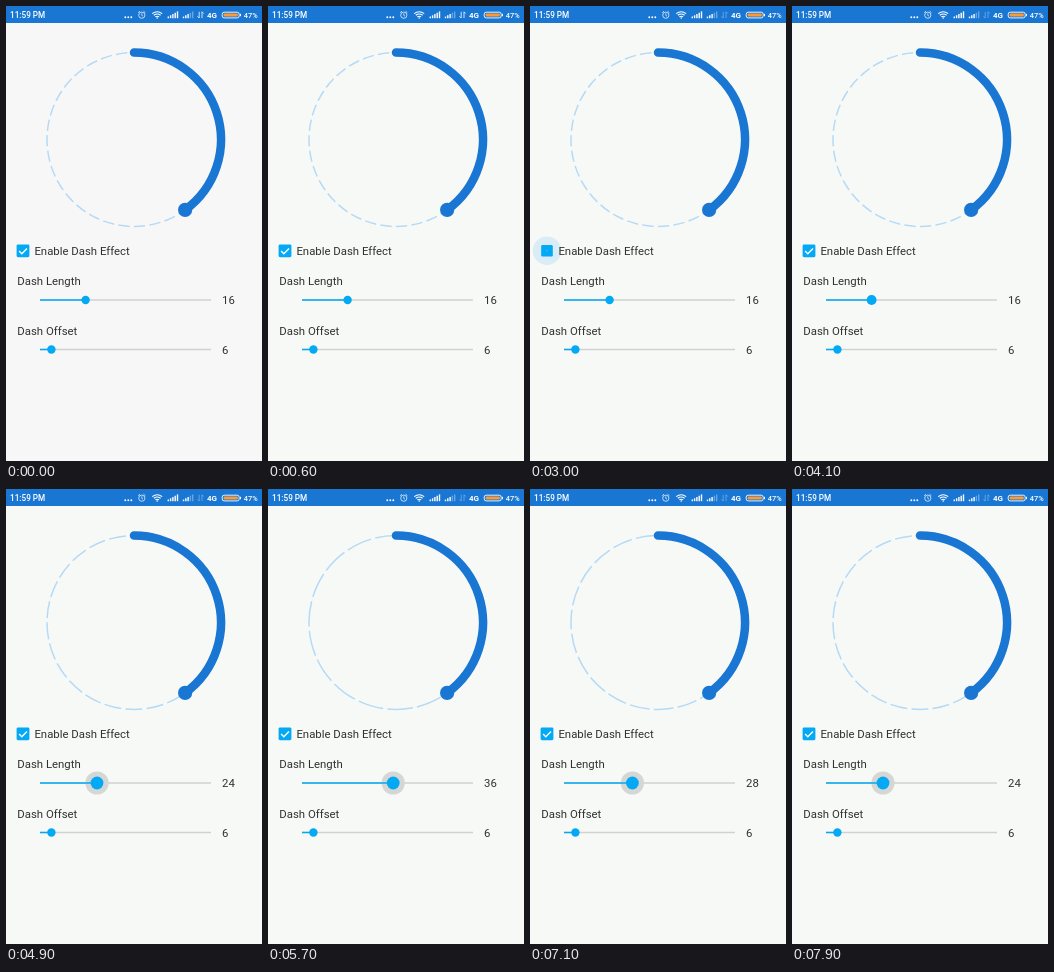
Write an HTML page that moves like this. It is 256x455 px and loops after 8 s.

```html
<!DOCTYPE html>
<html lang="en">
<head>
<meta charset="utf-8">
<title>Dash effect</title>
<style>
html, body { margin: 0; width: 100%; height: 100%; overflow: hidden; background: #f7f9f6; }
svg { display: block; width: 100vw; height: 100vh; }
text { font-family: Roboto, sans-serif; font-size: 11.38px; fill: #303230; }
.bar text { font-weight: 500; fill: #fff; }
.line { fill: none; stroke: #fff; }
</style>
</head>
<body>
<svg viewBox="0 0 256 455">
  <rect id="bg" width="256" height="455"/>
  <rect width="256" height="17" fill="#1976d2"/>

  <g class="bar">
    <text x="4" y="12" style="font-size:8.2px">11:59 PM</text>
    <g fill="#fff">
      <circle cx="119.3" cy="11.3" r=".95"/>
      <circle cx="122.3" cy="11.3" r=".95"/>
      <circle cx="125.3" cy="11.3" r=".95"/>
    </g>
    <g class="line" stroke-width=".8" opacity=".9">
      <circle cx="135.8" cy="9.2" r="3.1"/>
      <path d="M135.8 7.4V9.4L137 10.2M132.2 6.7L134 5.2M139.4 6.7L137.6 5.2"/>
    </g>
    <g class="line" stroke-width="1.1">
      <path d="M146.2 7.6Q151.2 3.8 156.2 7.6M147.8 9.3Q151.2 6.6 154.6 9.3M149.3 10.9Q151.2 9.5 153.1 10.9"/>
    </g>
    <circle cx="151.2" cy="12" r=".8" fill="#fff"/>
    <g id="signals" stroke="#fff" stroke-width="1.4"></g>
    <g class="line" stroke-width=".8">
      <path id="down" d="M193.2 5.8V12L191.5 10.3"/>
      <path id="up" d="M196 12V5.8L197.7 7.5"/>
    </g>
    <text x="201" y="12" style="font-size:8px;font-weight:700">4G</text>
    <rect class="line" x="216.2" y="6.2" width="17" height="5.7" rx="2" stroke-width=".9"/>
    <rect x="217.6" y="7.5" width="14.2" height="3.1" rx="1" fill="#ff9933"/>
    <path d="M234.5 7.8V10.2" stroke="#fff"/>
    <text x="237.8" y="12" style="font-size:7.4px">47%</text>
  </g>

  <circle id="ring" cx="128" cy="133.5" r="87" fill="none" stroke="#b5daf6" stroke-width="1.5"/>
  <path id="arc" fill="none" stroke="#1976d2" stroke-width="8.5" stroke-linecap="round"/>
  <circle id="knob" r="7.1" fill="#1976d2"/>

  <circle id="ripple" cx="17" cy="244.8" r="14.2"/>
  <rect id="box" rx="1.4"/>
  <rect id="hole" fill="#f7f9f6"/>
  <path id="tick" d="M13.1 245L15.8 247.7L21 242.4" fill="none" stroke="#fff" stroke-width="1.4" pathLength="1"/>
  <text x="28.4" y="249">Enable Dash Effect</text>

  <text x="11.3" y="279.3">Dash Length</text>
  <path d="M34 294H205" stroke="#d0d2d0" stroke-width="1.5"/>
  <circle id="halo" cy="294" fill="#d5d7d4"/>
  <path id="fill" stroke="#03a9f4" stroke-width="1.5"/>
  <circle id="thumb" cy="294" fill="#03a9f4"/>
  <text id="value" x="216" y="298.3"></text>

  <text x="11.3" y="328.8">Dash Offset</text>
  <path d="M34 343.5H205" stroke="#d0d2d0" stroke-width="1.5"/>
  <path d="M34 343.5H45.4" stroke="#03a9f4" stroke-width="1.5"/>
  <circle cx="45.4" cy="343.5" r="4.2" fill="#03a9f4"/>
  <text x="216" y="347.8">6</text>
</svg>
<script>
const LOOP = 8000, FRAME = 100, DP = 256 / 360;
const UNCHECK = 1300, CHECK = 3000, PRESS = 4100;
// [time, slider step]
const drag = [[0, 4], [4600, 5], [5000, 6], [5200, 7], [5500, 8], [5900, 9],
              [6400, 8], [6900, 7], [7100, 6], [7400, 5]];

const $ = id => document.getElementById(id);
const set = (id, attrs) => {
  for (const k in attrs) $(id).setAttribute(k, attrs[k]);
};
const ramp = (t, a, b) => Math.min(1, Math.max(0, (t - a) / (b - a)));
const mix = (a, b, p) => a + (b - a) * p;
const square = (id, size) => set(id, {
  x: 17 - size / 2, y: 244.8 - size / 2, width: size, height: size
});

function signal(x, strong) {
  let out = '';
  for (let i = 0; i < 5; i++) {
    const alpha = i < strong ? 1 : .35;
    out += `<path d="M${x + i * 2.3} 12.2V${10.6 - i * 1.3}" opacity="${alpha}"/>`;
  }
  return out;
}

function drawProgress() {
  const a = 0.4 * 2 * Math.PI;
  const x = 128 + 87 * Math.sin(a), y = 133.5 - 87 * Math.cos(a);
  set('arc', { d: `M128 46.5A87 87 0 0 1 ${x} ${y}` });
  set('knob', { cx: x, cy: y });
}

function drawStatus(t) {
  const p = ramp(t, 0, 500);
  set('bg', { fill: `rgb(${mix(248, 247, p)},${mix(247, 249, p)},${mix(248, 246, p)})` });
  set('up', { opacity: t < 1100 ? 1 : .4 });
  set('down', { opacity: t < 1700 ? 1 : .4 });
}

function drawCheckbox(t) {
  const on = t < UNCHECK || t >= CHECK;
  let size = 12.8, hole = 0, tick = 1, glow = 0;
  if (!on) {
    hole = mix(0, 9.8, ramp(t, 1360, 1600));
    size = mix(11.6, 12.8, ramp(t, 1400, 1600));
    tick = 0;
  } else if (t >= CHECK) {
    size = mix(11.6, 12.8, ramp(t, 3000, 3200));
    hole = mix(.7, 0, ramp(t, 3000, 3100));
    tick = ramp(t, 3080, 3300);
  }
  if (t >= 1100 && t < CHECK) glow = ramp(t, 1000, 1200) * (1 - ramp(t, 1450, 1900));
  if (t >= CHECK) glow = 1 - ramp(t, 3150, 3700);
  square('box', size);
  square('hole', hole);
  set('box', { fill: on ? '#03a9f4' : '#6f716f' });
  set('tick', { 'stroke-dasharray': `${tick} 2`, opacity: tick > 0 ? 1 : 0 });
  set('ripple', { fill: on ? '#daecf5' : '#eff1ee', opacity: glow });
}

function drawSlider(t) {
  const step = drag.filter(d => d[0] <= t).pop()[1];
  const length = step === 4 ? 16 : 4 * (step + 1);
  const x = 34 + 171 * step / 15;
  const press = t < PRESS ? 0 : ramp(t, PRESS - 100, PRESS + 200);
  set('fill', { d: `M34 294H${x}` });
  set('thumb', { cx: x, r: mix(4.2, 6.4, press) });
  set('halo', { cx: x, r: 11.6 * press });
  $('value').textContent = length;
  const solid = t >= UNCHECK && t < CHECK;
  set('ring', { 'stroke-dasharray': solid ? 'none' : `${length * DP} ${6 * DP}` });
}

function render(t) {
  drawStatus(t);
  drawCheckbox(t);
  drawSlider(t);
}

$('signals').innerHTML = signal(162.3, 5) + signal(177.5, 3);
drawProgress();
render(0);

let start;
function tick(now) {
  start ??= now;
  render(Math.floor((now - start) % LOOP / FRAME) * FRAME);
  requestAnimationFrame(tick);
}
requestAnimationFrame(tick);
</script>
</body>
</html>
```
